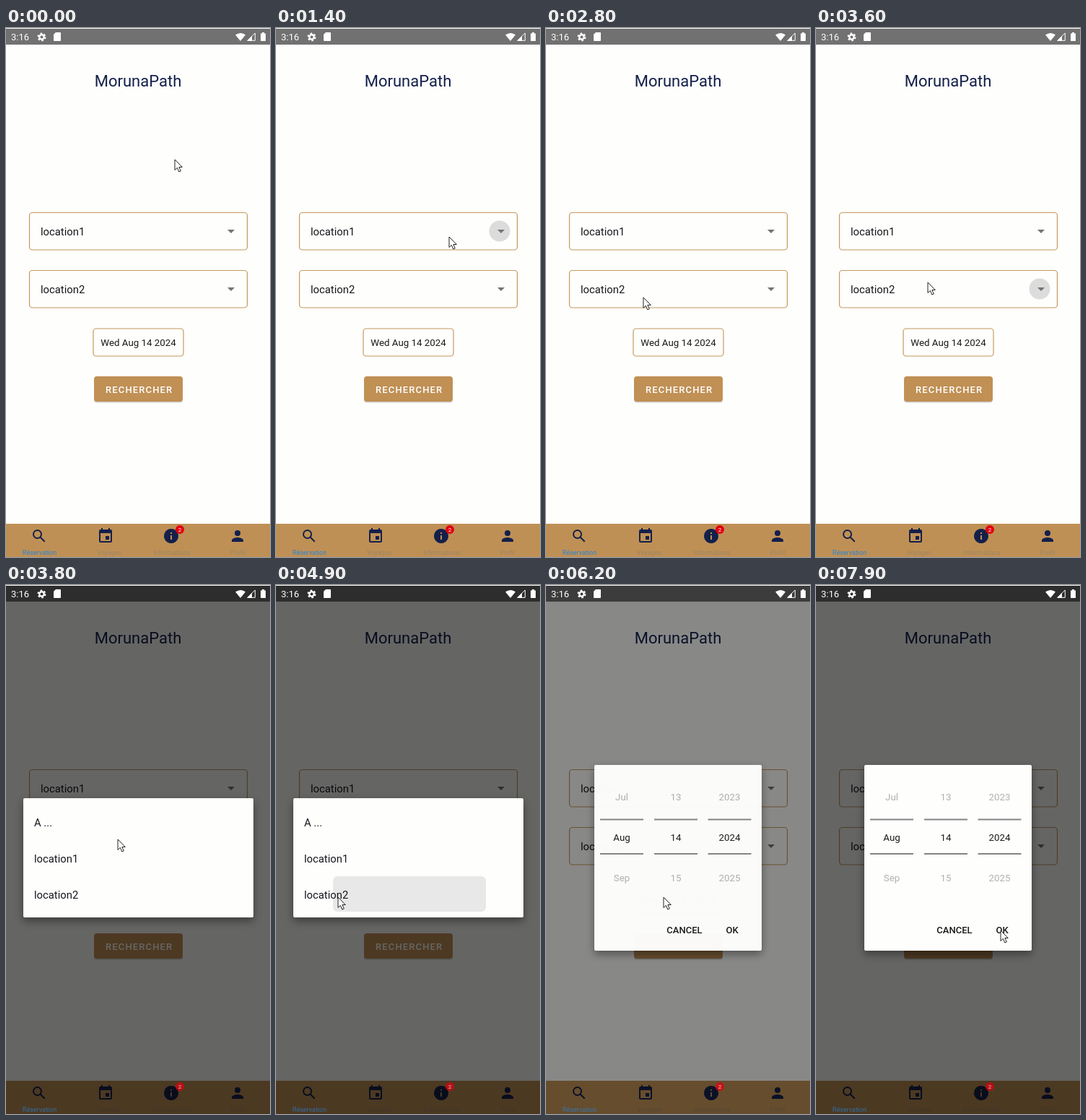
These frames come from a looping animation (366x732 px, 8000 ms). An HTML page:

```html
<!DOCTYPE html>
<html lang="fr">
<head>
<meta charset="utf-8">
<style>
  html, body { margin: 0; width: 100%; height: 100%; overflow: hidden; background: #fefefc; }
  svg { display: block; width: 366px; height: 732px; font-family: Roboto, sans-serif; }
  .title { font-size: 22px; fill: #14204a; }
  .item { font-size: 14.8px; fill: #16161c; }
  .small { font-size: 13.3px; fill: #1a1a1a; }
  .faded { fill: #b0b0b0; }
  .strong { font-size: 13px; font-weight: 500; }
  .tab { font-size: 9px; fill: #9c8465; }
  .mid { text-anchor: middle; }
  .box { fill: none; stroke: #c49a5f; stroke-width: 1.2; }
  .sheet { filter: drop-shadow(0 5px 6px rgba(0, 0, 0, .4)); }
</style>
</head>
<body>
<svg viewBox="0 0 366 732">
  <rect width="366" height="732" fill="#fefefc"/>
  <rect y="1" width="366" height="22" fill="#717171"/>
  <text class="title mid" x="183" y="81">MorunaPath</text>

  <circle id="press1" cx="310" cy="281" r="14.5" fill="#dcdcdc"/>
  <circle id="press2" cx="310" cy="361" r="14.5" fill="#dcdcdc"/>
  <rect class="box" x="32.5" y="255.5" width="302" height="51.5" rx="4"/>
  <rect class="box" x="32.5" y="335.5" width="302" height="51.5" rx="4"/>
  <rect class="box" x="121" y="416" width="125" height="38" rx="4"/>
  <text class="item" x="48" y="287">location1</text>
  <text class="item" x="48" y="367">location2</text>
  <path d="M307 279h10l-5 5zM307 359h10l-5 5z" fill="#757575"/>
  <text class="small mid" x="183.5" y="440">Wed Aug 14 2024</text>

  <rect x="122" y="483.5" width="123" height="35" rx="4" fill="#000" opacity=".18"/>
  <rect x="122" y="482" width="123" height="35" rx="4" fill="#c09055"/>
  <text class="strong" x="138" y="504.5" fill="#fff" letter-spacing="1.15">RECHERCHER</text>

  <rect y="686" width="366" height="46" fill="#bf9055"/>
  <g fill="#14204a">
    <g fill="none" stroke="#14204a" stroke-width="2">
      <circle cx="43.5" cy="700.5" r="5.5"/>
      <path d="M47.5 704.5l6.2 6.2"/>
    </g>
    <path transform="translate(126 691)" d="M17 12h-5v5h5zM16 1v2H8V1H6v2H5Q3 3 3 5V19Q3 21 5 21H19Q21 21 21 19V5Q21 3 19 3H18V1zM19 19H5V8H19z" fill-rule="evenodd"/>
    <path transform="translate(217 691)" d="M12 2a10 10 0 1 0 .01 0zM11 7h2v2h-2zM11 11h2v6h-2z" fill-rule="evenodd"/>
    <circle cx="321" cy="699" r="4"/>
    <path d="M313 711v-2c0-2.7 5.3-4 8-4s8 1.3 8 4v2z"/>
  </g>
  <g class="tab mid">
    <text x="143" y="729">Voyages</text>
    <text x="230" y="729">Informations</text>
    <text x="321" y="729">Profil</text>
  </g>

  <rect id="dim" y="1" width="366" height="731"/>

  <g id="marks">
    <text class="tab mid" x="46.5" y="729" style="fill:#2583d8">Réservation</text>
    <circle cx="241" cy="694" r="6" fill="#e3000f"/>
    <text class="mid" x="241" y="697" font-size="8" fill="#fff">2</text>
  </g>

  <g fill="#fff">
    <text x="7" y="17" font-size="13">3:16</text>
    <g fill="none" stroke="#fff">
      <circle cx="49.5" cy="12.5" r="3.2" stroke-width="2.4"/>
      <circle cx="49.5" cy="12.5" r="5" stroke-width="2" stroke-dasharray="2.6 2.636"/>
      <path d="M335 17.3L345.3 7V17.3z"/>
    </g>
    <path d="M69 6h6q1 0 1 1v10q0 1-1 1h-8q-1 0-1-1V9z"/>
    <path d="M318 9.5q7.5-5 14 0L325 18z"/>
    <path d="M334 18l7-7v7z"/>
    <path d="M353 7.5h2V6h3v1.500h2V18h-7z"/>
  </g>

  <g id="list">
    <rect class="sheet" x="24" y="295" width="319" height="165" rx="2" fill="#fefefd"/>
    <rect id="ripple" height="49" rx="6" fill="#e8e8e8"/>
    <text id="prompt" class="item" x="39" y="334"></text>
    <text class="item" x="39" y="384">location1</text>
    <text class="item" x="39" y="434">location2</text>
  </g>

  <g id="picker">
    <rect class="sheet" x="67" y="249" width="232" height="257" rx="2" fill="#fefefd"/>
    <g id="wheels" class="mid"></g>
    <text class="small strong mid" x="192" y="482">CANCEL</text>
    <text class="small strong mid" x="258" y="482">OK</text>
  </g>

  <path id="cursor" d="M0 0V14.500L3.400 11.400L5.800 17L8.300 15.900L5.900 10.500H10.300Z" fill="#fff" stroke="#222"/>
</svg>
<script>
const el = id => document.getElementById(id);
const clamp = v => Math.max(0, Math.min(1, v));
const set = (id, attrs) => {
  for (const name in attrs) el(id).setAttribute(name, attrs[name]);
};

const LOOP = 8000, STEP = 100;

// Time, x, y of the pointer tip
const pointerPath = [
  [0, 234, 182], [400, 234, 182], [1200, 240, 289], [1700, 240, 289],
  [2300, 130, 378], [2600, 130, 378], [3300, 155, 352], [3900, 155, 352],
  [4700, 86, 432], [5300, 86, 432], [5900, 163, 432], [7200, 163, 432],
  [7800, 256, 478], [LOOP, 256, 478]
];

const lists = [
  { open: 1400, pick: 2400, close: 2580, prompt: 'De ...', rowY: 353 },
  { open: 3600, pick: 4800, close: 4980, prompt: 'A ...', rowY: 403 }
];
const picker = { open: 6044, close: Infinity };

const columns = [
  [105, 'Jul', 'Aug', 'Sep'], [180, '13', '14', '15'], [254.5, '2023', '2024', '2025']
];
el('wheels').innerHTML = columns.map(([x, ...values]) =>
  values.map((value, row) =>
    `<text class="small ${row === 1 ? '' : 'faded'}" x="${x}" y="${298 + 56 * row}">${value}</text>`
  ).join('') +
  `<path d="M${x - 30} 324.500h60m-60 47.500h60" stroke="#858585" stroke-width="2"/>`
).join('');

function pointerAt(t) {
  const i = pointerPath.findIndex(p => p[0] > t);
  const [t0, x0, y0] = pointerPath[i - 1], [t1, x1, y1] = pointerPath[i];
  const u = (t - t0) / (t1 - t0), eased = u * u * (3 - 2 * u);
  return [x0 + (x1 - x0) * eased, y0 + (y1 - y0) * eased];
}

const shown = (t, { open, close }) =>
  Math.min(clamp((t - open) / 200), 1 - clamp((t - close) / 110));

function draw(t) {
  const listLevels = lists.map(list => shown(t, list));
  const pickerLevel = shown(t, picker);
  const level = Math.max(...listLevels, pickerLevel);

  set('dim', { opacity: 0.6 * level });
  set('marks', { opacity: 1 - 0.3 * level });
  set('list', { opacity: clamp(1.25 * Math.max(...listLevels)) });
  set('picker', { opacity: clamp(1.25 * pickerLevel) });

  lists.forEach(({ open }, i) =>
    set('press' + (i + 1), { opacity: t < open ? 0 : 1 - clamp((t - open) / 200) }));

  const active = lists[t < 3000 ? 0 : 1];
  const width = Math.min(319, 212 * Math.max(0, t - active.pick) / 100);
  el('prompt').textContent = active.prompt;
  set('ripple', { x: 185 - Math.min(161, width / 2), y: active.rowY, width });

  set('cursor', { transform: `translate(${pointerAt(t)})` });
}

function tick() {
  const t = performance.now() % LOOP;
  draw(Math.floor(t / STEP) * STEP);
  requestAnimationFrame(tick);
}
tick();
</script>
</body>
</html>
```
